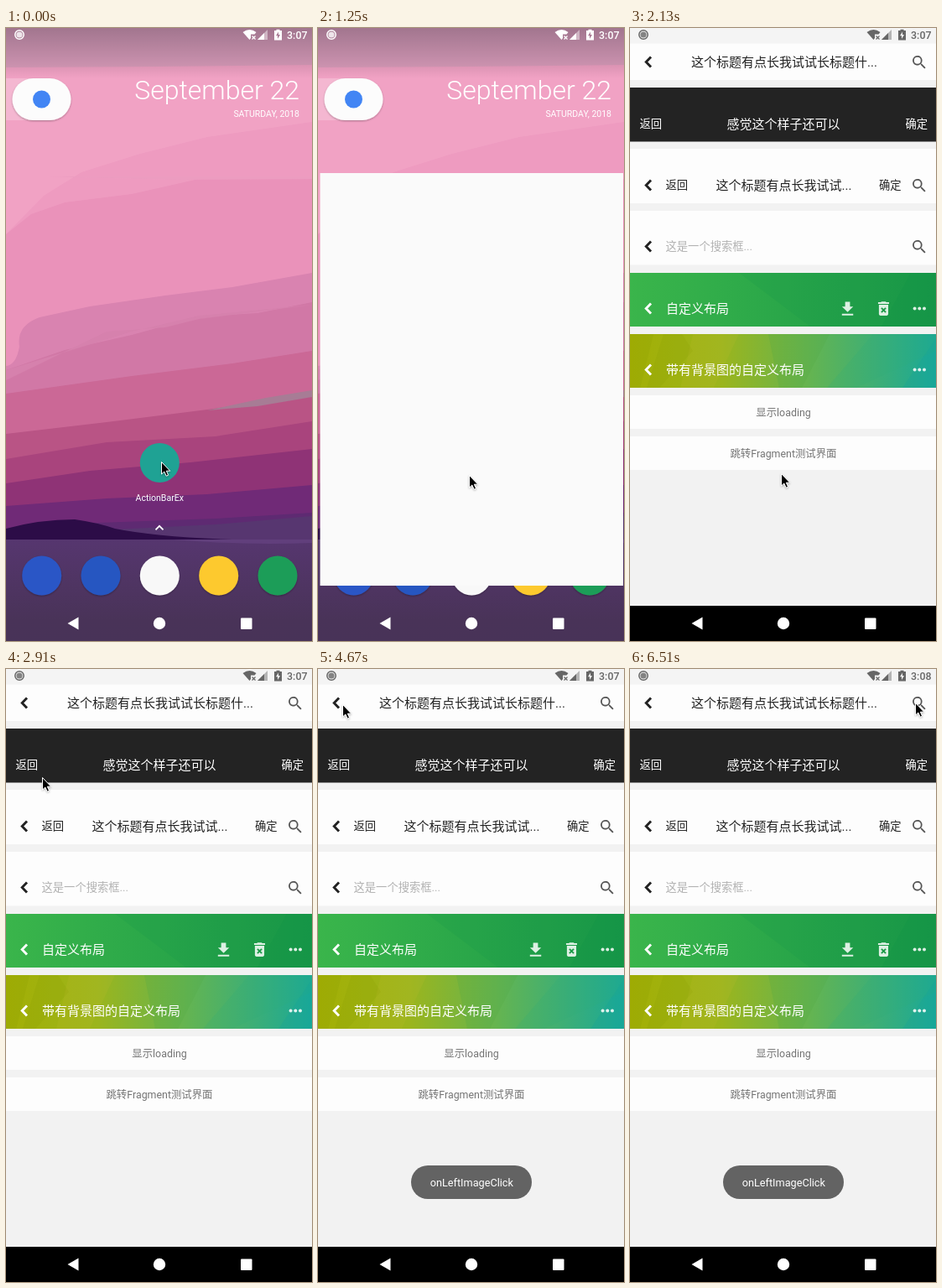
These frames come from a looping animation (365x731 px, 8000 ms). An HTML page:

```html
<!DOCTYPE html>
<html lang="zh-CN">
<head>
<meta charset="utf-8">
<title>ActionBarEx</title>
<style>
html, body { margin: 0; width: 100%; height: 100%; overflow: hidden; background: #000; }
body { position: relative; }
svg { position: absolute; left: 0; top: 0; width: 365px; height: 731px; overflow: hidden; }
text { font-family: Roboto, "Noto Sans CJK SC", "Noto Sans CJK", sans-serif; }
.mid { text-anchor: middle; }
.end { text-anchor: end; }
.title { font-size: 15px; }
.action { font-size: 13.3px; }
.button { font-size: 12.4px; fill: #747474; }
.clock { font-size: 12.4px; font-weight: 500; fill: currentColor; }
.chevron { fill: none; stroke: currentColor; stroke-width: 2.9; }

.window, .content, .status, .toast, .cursor, .before, .after { animation: 8s step-end infinite; }
.window { animation-name: reveal; }
.content { animation-name: fade; }
.status { animation-name: tint; }
.toast { animation-name: toast; }
.cursor { animation-name: point; }
.before { animation-name: before; }
.after { animation-name: after; }

@keyframes reveal {
  0% { visibility: hidden; clip-path: inset(485px 150px 185px 152px); }
  12.25% { visibility: visible; clip-path: inset(485px 150px 185px 152px); }
  13.375% { clip-path: inset(460px 95px 176px 96px); }
  14.5% { clip-path: inset(347px 32px 132px 32px); }
  15.625% { clip-path: inset(173px 1px 66px 2.5px); }
  16.75% { clip-path: inset(40px 0 15px 0); }
  17.75% { clip-path: inset(0 0 1px 0); }
  18.875%, 100% { visibility: visible; clip-path: inset(0 0 0 0); }
}
@keyframes fade {
  0% { opacity: 0; transform: translateY(.7px); }
  16.75% { opacity: .2; transform: translateY(.7px); }
  17.75% { opacity: .67; transform: translateY(.7px); }
  18.875%, 100% { opacity: 1; transform: none; }
}
@keyframes tint {
  0% { fill: #babee1; }
  18.875%, 100% { fill: #f4f4f4; }
}
@keyframes toast {
  0% { opacity: 0; }
  51.625% { opacity: 0; animation-timing-function: steps(5, start); }
  57.25%, 100% { opacity: 1; }
}
@keyframes before { 0% { opacity: 1; } 80.25%, 100% { opacity: 0; } }
@keyframes after { 0% { opacity: 0; } 80.25%, 100% { opacity: 1; } }
@keyframes point {
  0% { transform: translate(185px, 517px); }
  6.625% { transform: translate(180px, 533px); }
  26.625% { transform: translate(180px, 533px); animation-timing-function: steps(1, start); }
  27.7125% { transform: translate(180px, 531px); animation-timing-function: steps(4, start); }
  32.0375% { transform: translate(244px, 390px); animation-timing-function: steps(5, start); }
  37.4625% { transform: translate(43px, 129px); }
  37.5% { transform: translate(43px, 129px); animation-timing-function: steps(2, start); }
  39.75% { transform: translate(39px, 128px); }
  41.875% { transform: translate(39px, 128px); animation-timing-function: steps(6, start); }
  48.325% { transform: translate(22px, 41px); }
  58.375% { transform: translate(22px, 41px); animation-timing-function: steps(1, start); }
  59.4625% { transform: translate(29px, 42px); animation-timing-function: steps(3, start); }
  62.7125% { transform: translate(224px, 55px); }
  65% { transform: translate(224px, 55px); animation-timing-function: steps(5, start); }
  70.4125% { transform: translate(290px, 60px); animation-timing-function: steps(5, start); }
  75.8375% { transform: translate(338px, 40px); }
  75.875%, 81.375% { transform: translate(340px, 40px); }
  81.4%, 100% { transform: translate(341px, 39px); }
}
</style>
</head>
<body>

<svg viewBox="0 0 365 731">
  <defs>
    <linearGradient id="scrim" x2="0" y2="1">
      <stop offset="0" stop-color="#4a3142" stop-opacity=".5"/>
      <stop offset="1" stop-color="#4a3142" stop-opacity="0"/>
    </linearGradient>
    <linearGradient id="dock" x2="0" y2="1">
      <stop offset="0" stop-color="#56366f"/>
      <stop offset=".8" stop-color="#493358"/>
      <stop offset="1" stop-color="#483358"/>
    </linearGradient>
    <linearGradient id="green">
      <stop offset="0" stop-color="#3ab54b"/>
      <stop offset="1" stop-color="#1a9847"/>
    </linearGradient>
    <linearGradient id="rainbow">
      <stop offset="0" stop-color="#a3af04"/>
      <stop offset=".3" stop-color="#9bb51d"/>
      <stop offset=".6" stop-color="#62b453"/>
      <stop offset="1" stop-color="#1aa997"/>
    </linearGradient>
    <filter id="soft" x="-30%" y="-30%" width="160%" height="160%">
      <feDropShadow dx="0" dy="1" stdDeviation="1" flood-opacity=".3"/>
    </filter>
    <g id="indicators" fill="currentColor">
      <circle cx="16" cy="8" r="5.2" fill="none" stroke="currentColor" stroke-width="1.5"/>
      <circle cx="16" cy="8" r="3.6" opacity=".8"/>
      <path d="M282.5 5Q290.5-1 298.5 5L296.5 7.5H292V12L290.5 14Z"/>
      <path d="M293.5 9.5l4 4m0-4l-4 4" stroke="currentColor" stroke-width="1.2"/>
      <path d="M300 14L312 2V14Z" opacity=".45"/>
      <path d="M300 14L308 6V14Z"/>
      <path fill-rule="evenodd" d="M320 3h2.5V1.7h4V3H329V14.5H320ZM325 4.5L322 9.3H324V13L327 8H325Z"/>
    </g>
    <path id="chevron" d="M4-6L-1.8 0L4 6" class="chevron"/>
    <path id="search" transform="translate(-10.6 -10.2) scale(.888)" fill="currentColor" d="M15.5 14h-.79l-.28-.27A6.5 6.5 0 1 0 13.73 14.43l.27.28v.79l5 4.99L20.49 19zM9.5 14a4.5 4.5 0 1 1 0-9a4.5 4.5 0 0 1 0 9z"/>
    <g id="dots" fill="#fff" opacity=".85">
      <circle cx="-5.7" r="2"/><circle r="2"/><circle cx="5.7" r="2"/>
    </g>
  </defs>

  <!-- wallpaper -->
  <rect width="365" height="731" fill="#f1a2c4"/>
  <path fill="#ee9bc0" d="M365 112L240 130L160 150L90 172L45 200L0 246V731H365Z"/>
  <path fill="#ea92ba" d="M365 178L230 180L150 198L70 208L30 222L0 246V731H365Z"/>
  <path fill="#ec9cc0" d="M48 177H365V180L210 181Z"/>
  <path fill="#d983b0" d="M365 292L270 309L190 319L100 332L40 345Q12 355 16 380Q12 402 0 403V731H365Z"/>
  <path fill="#d178a6" d="M365 327L300 340L230 344L150 366L70 384L0 408V731H365Z"/>
  <path fill="#d681ad" d="M365 330L230 347L190 357L120 362L0 420V408L150 362L230 343Z"/>
  <path fill="#cb6896" d="M365 385L270 400L150 415L0 436V731H365Z"/>
  <path fill="#b95485" d="M365 438L240 455L120 470L0 484V731H365Z"/>
  <path fill="#a77c95" d="M365 432L310 441L240 456L300 451L365 440Z"/>
  <path fill="#a9447d" d="M365 469L250 487L120 494L0 514V731H365Z"/>
  <path fill="#8f3376" d="M365 502L220 518L100 528L0 543V731H365Z"/>
  <path fill="#702a77" d="M365 545L240 556L120 561L0 570V731H365Z"/>
  <path fill="#5e2a72" d="M365 578L250 585L110 590L0 598V731H365Z"/>
  <path fill="#573670" d="M365 582L250 592L130 598L200 612H365Z"/>
  <path fill="#2c0c47" d="M0 597Q40 586 82 586Q110 590 130 597Q180 607 270 610H0Z"/>
  <rect width="365" height="60" fill="url(#scrim)"/>
  <path fill="#a98ca3" opacity=".35" d="M0 0H365V44L180 46L0 47Z"/>
  <rect y="610" width="365" height="121" fill="url(#dock)"/>
  <path fill="#6a4585" opacity=".6" d="M200 610H365V614Q280 617 200 610Z"/>

  <!-- launcher -->
  <g color="#fff"><use href="#indicators"/><text class="clock end" x="359.5" y="13">3:07</text></g>
  <rect y="60" width="40" height="50" fill="#fff" opacity=".22"/>
  <rect x="7.5" y="60" width="70" height="50" rx="25" fill="#fcfcfc" filter="url(#soft)"/>
  <circle cx="42.5" cy="85" r="10.5" fill="#4285f4"/>
  <g fill="#fff">
    <text class="end" x="350" y="84.5" font-size="32" font-weight="300">September 22</text>
    <text class="end" x="350" y="106" font-size="10.5">SATURDAY, 2018</text>
    <text class="mid" x="183.3" y="563.5" font-size="10.6">ActionBarEx</text>
  </g>
  <circle cx="183.3" cy="518.5" r="23.5" fill="#1fa294"/>
  <path d="M178.5 598.3L183 593.8L187.5 598.3" fill="none" stroke="#fff" stroke-width="1.7"/>
  <g filter="url(#soft)">
    <circle cx="42.7" cy="653" r="23.5" fill="#2a56c6"/>
    <circle cx="113" cy="653" r="23.5" fill="#2657c1"/>
    <circle cx="183.3" cy="653" r="23.5" fill="#f8f8f8"/>
    <circle cx="253.7" cy="653" r="23.5" fill="#fdc92f"/>
    <circle cx="324" cy="653" r="23.5" fill="#1f9d58"/>
  </g>
</svg>

<svg class="window" viewBox="0 0 365 731">
  <rect width="365" height="731" fill="#fafafa"/>
  <g class="content">
    <rect y="18" width="365" height="671" fill="#f2f2f2"/>
    <g fill="#fdfdfd">
      <rect y="18" width="365" height="44"/>
      <rect y="144" width="365" height="65"/>
      <rect y="218" width="365" height="64.5"/>
      <rect y="438" width="365" height="40"/>
      <rect y="487" width="365" height="40"/>
    </g>
    <rect y="71" width="365" height="64.5" fill="#232323"/>
    <rect y="292" width="365" height="64" fill="url(#green)"/>
    <path fill="#0c8f45" opacity=".13" d="M130 292H365V356H215Z"/>
    <path fill="#0c8f45" opacity=".16" d="M335 292H365V356H300Z"/>
    <rect y="365" width="365" height="64" fill="url(#rainbow)"/>
    <path fill="#879b00" opacity=".2" d="M0 365H28L12 429H0ZM40 365H62L75 385L35 429H20Z"/>
    <path fill="#c3b930" opacity=".15" d="M75 365H130L100 429H60Z"/>
    <path fill="#4fa846" opacity=".25" d="M165 365H238L205 429H178Z"/>
    <path fill="#2fa87a" opacity=".2" d="M290 365H365V385L270 429H235Z"/>
    <path fill="#119f9c" opacity=".25" d="M365 370V429H325Z"/>

    <g color="#222" fill="#222">
      <use href="#chevron" x="21" y="40.5"/>
      <use href="#chevron" x="21" y="187.5"/>
      <use href="#chevron" x="21" y="260.5"/>
      <text class="title mid" x="184" y="46">这个标题有点长我试试长标题什...</text>
      <text class="action" x="42.5" y="192">返回</text>
      <text class="title mid" x="183.5" y="193">这个标题有点长我试试...</text>
      <text class="action" x="297" y="192">确定</text>
    </g>
    <g color="#545454">
      <use href="#search" x="345" y="40.5"/>
      <use href="#search" x="345" y="187.5"/>
      <use href="#search" x="345" y="260.5"/>
    </g>
    <text class="action" x="42.5" y="265" fill="#b2b2b2">这是一个搜索框...</text>

    <g color="#fff" fill="#fff">
      <text class="action" x="11.5" y="119">返回</text>
      <text class="title mid" x="183" y="120">感觉这个样子还可以</text>
      <text class="action" x="328.5" y="119">确定</text>
      <use href="#chevron" x="21" y="334.5"/>
      <use href="#chevron" x="21" y="407.5"/>
      <text class="title" x="43" y="340">自定义布局</text>
      <text class="title" x="43" y="413">带有背景图的自定义布局</text>
      <use href="#dots" x="345.3" y="334.5"/>
      <use href="#dots" x="345.3" y="407.5"/>
      <path opacity=".85" transform="translate(248 323.5) scale(.96)" d="M19 9h-4V3H9v6H5l7 7zM5 18v2h14v-2z"/>
      <path opacity=".85" transform="translate(291.3 323.4) scale(.93)" fill-rule="evenodd" d="M6 19c0 1.1.9 2 2 2h8c1.1 0 2-.9 2-2V7H6zM8.5 11.9l1.4-1.4L12 12.6l2.1-2.1 1.4 1.4L13.4 14l2.1 2.1-1.4 1.4L12 15.4l-2.1 2.1-1.4-1.4L10.6 14zM15.5 4l-1-1h-5l-1 1H5v2h14V4z"/>
    </g>
    <text class="button mid" x="183" y="463">显示loading</text>
    <text class="button mid" x="183" y="512">跳转Fragment测试界面</text>
  </g>
  <rect class="status" width="365" height="18.5"/>
  <g color="#666">
    <use href="#indicators"/>
    <text class="clock end before" x="359.5" y="13">3:07</text>
    <text class="clock end after" x="359.5" y="13">3:08</text>
  </g>
  <rect y="689" width="365" height="42"/>
  <g class="toast">
    <rect x="111" y="592" width="144" height="40" rx="20" fill="#636363"/>
    <text class="mid" x="183.3" y="617" font-size="12.7" fill="#fff">onLeftImageClick</text>
  </g>
</svg>

<svg viewBox="0 0 365 731">
  <g fill="#fff">
    <path d="M73.5 710L86.5 702.5V717.5Z"/>
    <circle cx="183" cy="710" r="7.2"/>
    <rect x="280" y="703.5" width="13.5" height="13.5" rx="1"/>
  </g>
  <g class="cursor">
    <path filter="url(#soft)" stroke="#fff" d="M.5 .5V15L3.8 12L6.2 17.2L8.6 16.2L6.3 11.2H10.7Z"/>
  </g>
</svg>

</body>
</html>
```
